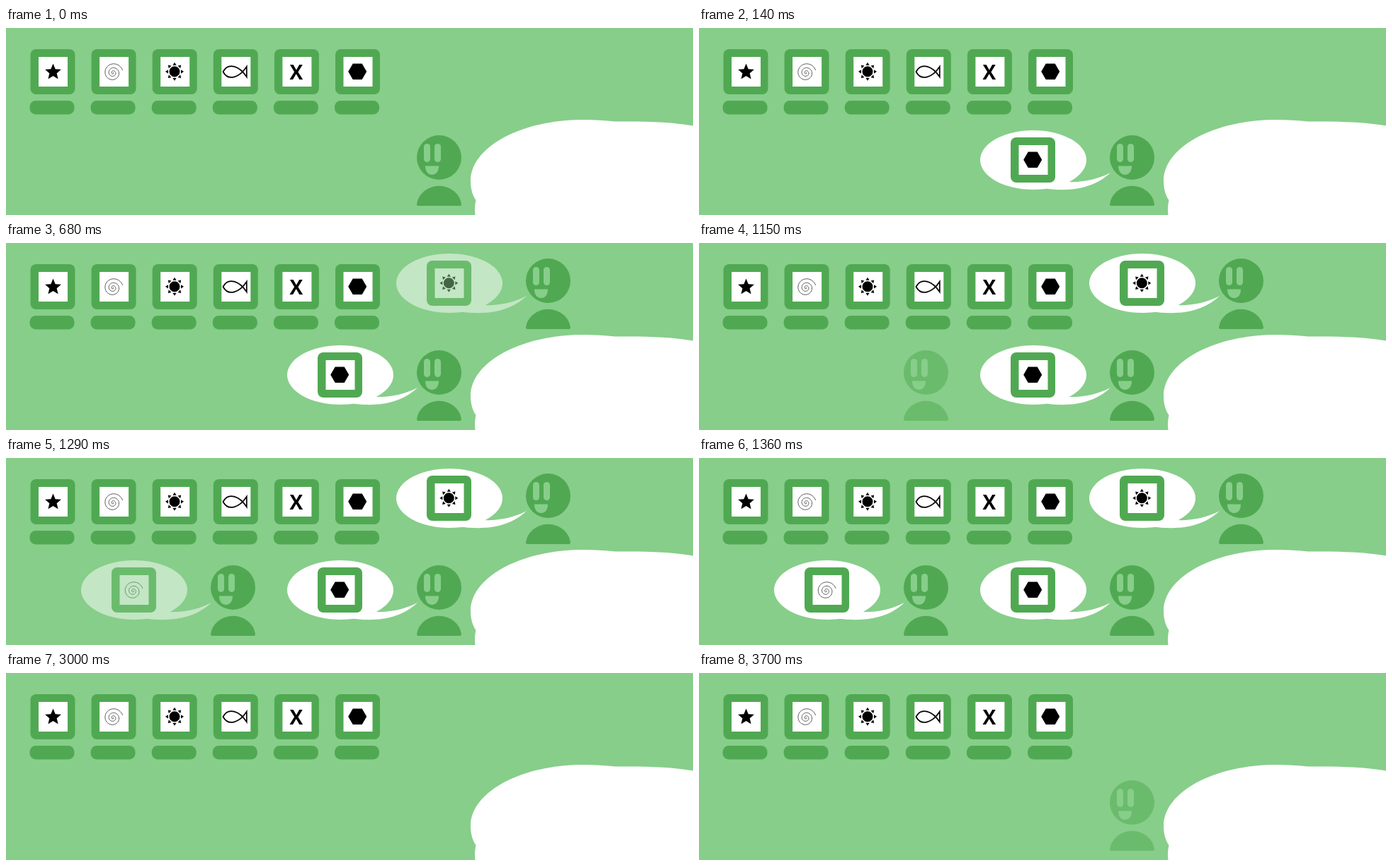
Write an HTML page that moves like this. It is 970 by 265 pixels and loops after 3.77 s.

```html
<!DOCTYPE html>
<html lang="en">
<head>
<meta charset="utf-8">
<title>Picture choices</title>
<style>
  html, body { margin: 0; width: 100%; height: 100%; overflow: hidden; background: #87ce8a; }
  svg { display: block; }
</style>
</head>
<body>
<svg id="stage" width="970" height="265" viewBox="0 0 970 265"></svg>
<script>
const LOOP = 3770, STEP = 70, TALK_END = 2860;
const BG = '#87ce8a', GREEN = '#50a952';
const stage = document.getElementById('stage');

// Points around a centre; radii alternate through the given list.
function ring(cx, cy, count, radii, turn) {
  return Array.from({ length: count }, (_, i) => {
    const a = turn + i * 2 * Math.PI / count, r = radii[i % radii.length];
    return (cx + r * Math.cos(a)).toFixed(2) + ',' + (cy + r * Math.sin(a)).toFixed(2);
  }).join(' ');
}

function spiral(cx, cy, radius, turns, endAngle) {
  const points = [];
  for (let i = 0; i <= 140; i++) {
    const s = i / 140, r = radius * s ** 1.6, a = endAngle - (1 - s) * turns * 2 * Math.PI;
    points.push((cx + r * Math.cos(a)).toFixed(2) + ',' + (cy + r * Math.sin(a)).toFixed(2));
  }
  return `<polyline points="${points.join(' ')}" fill="none" stroke="#333" stroke-width=".8"/>`;
}

function sun(cx, cy) {
  let rays = '';
  for (let i = 0; i < 8; i++) {
    rays += `<path d="M9 -2.6L13 0L9 2.6Z" transform="translate(${cx} ${cy}) rotate(${i * 45})"/>`;
  }
  return `<circle cx="${cx}" cy="${cy}" r="7.5"/>` + rays;
}

const icons = {
  star: `<polygon points="${ring(32, 32.5, 10, [12, 5.4], -Math.PI / 2)}"/>`,
  spiral: spiral(30.5, 33.5, 14, 3.5, -0.26),
  sun: sun(31.3, 31.8),
  fish: '<path d="M47 39.3C37 24 21 18 13.7 32C21 46 37 40 47 24.7Z" fill="none" stroke="#000" stroke-width="1.7"/>',
  cross: '<text x="31" y="43" font-family="Open Sans, sans-serif" font-weight="700" font-size="28" text-anchor="middle">X</text>',
  hexagon: `<polygon points="${ring(31.2, 31.8, 6, [13], 0)}"/>`
};

const tile = (x, y, name) => `<g transform="translate(${x} ${y})">
  <rect width="63" height="64" rx="8" fill="${GREEN}"/>
  <rect x="11.5" y="11" width="41" height="42" fill="#fff"/>${icons[name]}</g>`;

const person = `<g class="person" fill="${GREEN}">
  <circle cx="611.5" cy="183.5" r="31.5"/>
  <path d="M582 252Q580 252 580 249.5A31.7 29 0 0 1 643 249.5Q643 252 641 252Z"/>
  <g fill="${BG}">
    <rect x="590" y="164" width="9" height="26" rx="4.5"/>
    <rect x="605" y="164" width="9" height="26" rx="4.5"/>
    <path d="M592 195.5H611C611 203 607.5 208 601.5 208S592 203 592 195.5Z"/>
  </g></g>`;

const bubble = name => `<g class="bubble">
  <g fill="#fff"><ellipse cx="472" cy="187" rx="75" ry="42"/>
  <path d="M581 205C562 215 541 219 520 218L485 227C525 233 558 227 581 205Z"/></g>
  ${tile(440, 155, name)}</g>`;

const cast = [
  { dx: 0, dy: 0, icon: 'hexagon', start: -70 },
  { dx: 154, dy: -130, icon: 'sun', start: 540 },
  { dx: -291, dy: 0, icon: 'spiral', start: 1150 }
];

stage.innerHTML = `<rect width="970" height="265" fill="${BG}"/>` +
  Object.keys(icons).map((name, i) => {
    const x = 34.5 + i * 86.1;
    return tile(x, 30, name) +
      `<rect x="${x - 1}" y="103" width="63" height="19.5" rx="8.5" fill="${GREEN}"/>`;
  }).join('') +
  cast.map(c => `<g transform="translate(${c.dx} ${c.dy})">${bubble(c.icon)}${person}</g>`).join('') +
  `<path fill="#fff" d="M656 217C656 169 727 130 815 130C831 130 846 131 860 132.5
    C900 132 940 133 970 138.5V265H662.5C661.5 258 662 250 663.5 244C659 238 656 228 656 217Z"/>`;

const people = stage.querySelectorAll('.person');
const bubbles = stage.querySelectorAll('.bubble');

// Appear in two steps: half, then full.
const appear = (t, start) => t < start ? 0 : t < start + STEP ? 0.5 : 1;

function draw(now) {
  const t = now % LOOP;
  cast.forEach((c, i) => {
    const leave = 1 - appear(t, TALK_END + STEP);
    const early = c.start < 0 ? appear(t, LOOP + c.start) : 0;
    people[i].setAttribute('opacity', Math.max(early, Math.min(leave, appear(t, c.start))));
    bubbles[i].setAttribute('opacity', t < TALK_END ? appear(t, c.start + 2 * STEP) : 0);
  });
}

let origin;
function tick(now) {
  origin ??= now;
  draw(now - origin);
  requestAnimationFrame(tick);
}
draw(0);
requestAnimationFrame(tick);
</script>
</body>
</html>
```
